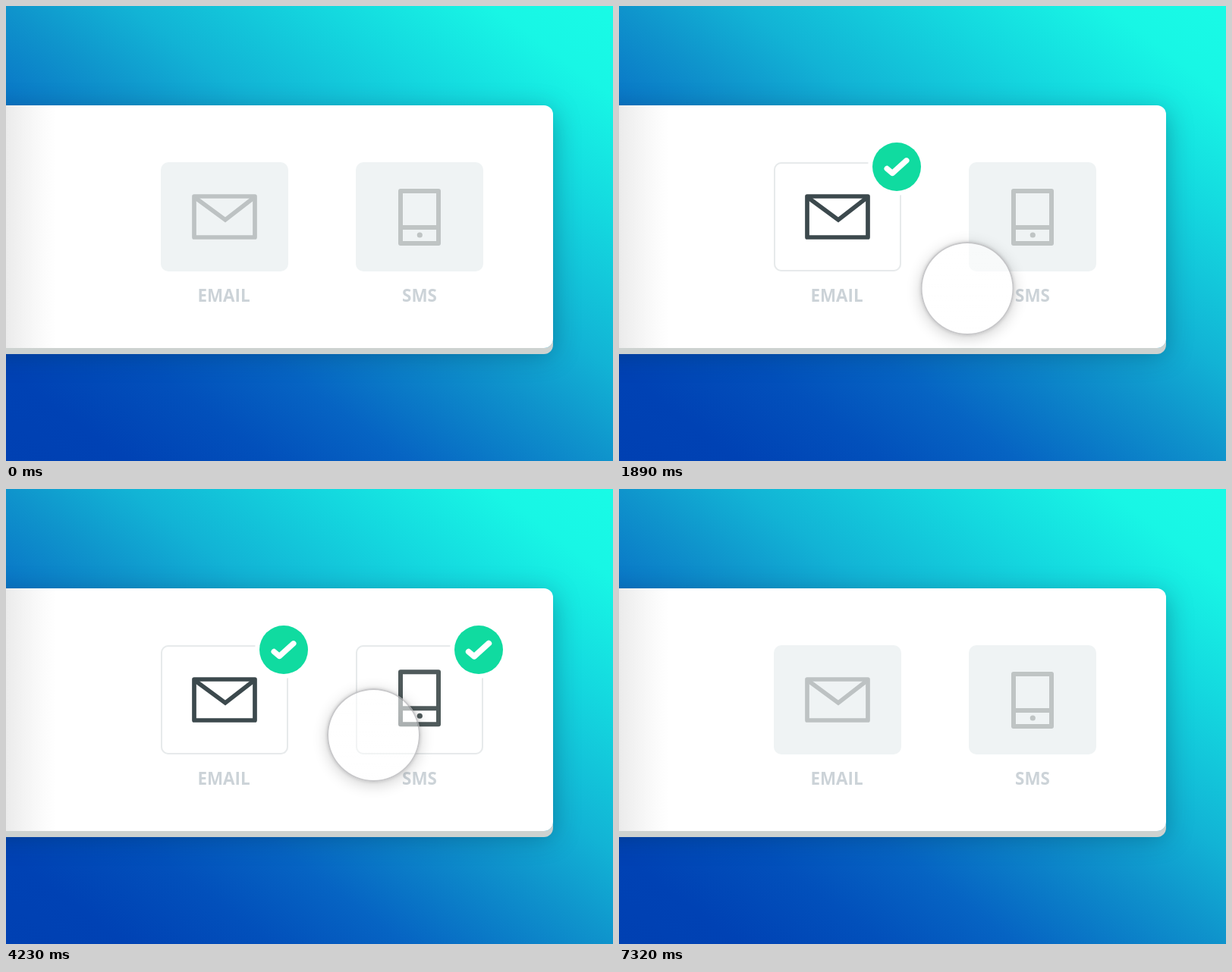
These frames come from a looping animation (800 px wide and 600 px high, 8.34 s). An HTML page:

```html
<!DOCTYPE html>
<html lang="en">
<head>
<meta charset="utf-8">
<title>Notification options</title>
<style>
  html, body { margin: 0; width: 100%; height: 100%; overflow: hidden; }
  #stage {
    position: relative; width: 800px; height: 600px; overflow: hidden;
    background: linear-gradient(to top right, #0040b2, #0042b4 10%, #0250bb 22%, #0664c3 33%,
      #0f94cc 50%, #12b3d5 60%, #14d8df 76%, #18f6e5 90%, #18fbe6);
  }
  #panel {
    position: absolute; left: -40px; top: 131px; width: 761px; height: 320px;
    border-radius: 0 12px 12px 0;
    background: linear-gradient(90deg, #ebebeb 40px, #f4f4f4 65px, #fbfbfb 88px, #fff 106px);
    box-shadow: 0 8px 0 #cdd2d0, 0 8px 34px rgba(0, 40, 70, .36);
  }
  svg { position: absolute; left: 0; top: 0; }
  text { font: 700 22.4px "Open Sans", sans-serif; fill: #ccd3d8; text-anchor: middle; }
  .icon { fill: none; stroke-linejoin: round; }
  .on { fill: #fff; stroke: #e7eaeb; stroke-width: 2; }
  .check { fill: none; stroke: #fff; stroke-width: 7.4; stroke-linecap: round; stroke-linejoin: round; }
  #cursor {
    position: absolute; left: -61.5px; top: -61.5px; width: 123px; height: 123px;
    box-sizing: border-box; border-radius: 50%; border: 2px solid rgba(182, 182, 184, .75);
    background: linear-gradient(rgba(255, 255, 255, .6), rgba(255, 255, 255, .4));
    background-clip: padding-box;
    box-shadow: 0 0 4px rgba(0, 0, 0, .15), 0 4px 19px rgba(0, 0, 0, .19);
  }
</style>
</head>
<body>
<div id="stage">
  <div id="panel"></div>
  <svg width="800" height="600" viewBox="0 0 800 600">
    <g id="email"></g>
    <g id="sms" transform="translate(257 0)"></g>
  </svg>
  <div id="cursor"></div>
</div>
<script>
const LOOP = 8340, STEP = 30;

const envelope = `<g stroke-width="5.7"><rect x="248" y="251" width="80" height="54"/>
  <path d="M249 252.5L289 282L327 252.5" stroke-linejoin="miter"/></g>`;
const phone = `<g stroke-width="6"><rect x="263" y="244" width="50" height="69"/>
  <path d="M263 292H313"/></g><circle class="dot" cx="288.3" cy="302" r="3.6" stroke="none"/>`;

function buildOption(id, icon, label, x) {
  const root = document.getElementById(id);
  root.innerHTML = `<rect x="204" y="206" width="168" height="144" rx="10" fill="#eff3f4"/>
    <rect class="on" x="205" y="207" width="166" height="142" rx="9"/>
    <g class="icon">${icon}</g>
    <g class="badge"><circle r="38" fill="#fff"/><circle r="32" fill="#10dba0"/></g>
    <path class="check" d="M-12.8 2.5L-5.7 8.5L12.8 -8.2"/>
    <text x="${x}" y="390">${label}</text>`;
  const find = name => root.querySelector("." + name);
  return { on: find("on"), icon: find("icon"), badge: find("badge"), check: find("check"), dot: find("dot") };
}

const email = buildOption("email", envelope, "EMAIL", 287);
const sms = buildOption("sms", phone, "SMS", 288);
const cursor = document.getElementById("cursor");

const clamp = v => Math.min(1, Math.max(0, v));
const span = (t, a, b) => clamp((t - a) / (b - a));
const mix = (a, b, k) => a + (b - a) * k;
const hump = k => Math.sin(Math.PI * k);
const easeOut = k => 1 - (1 - k) ** 3;
const easeInOut = k => k < .5 ? 2 * k * k : 1 - 2 * (1 - k) ** 2;
const backOut = (k, s) => k > 0 ? 1 + (s + 1) * (k - 1) ** 3 + s * (k - 1) ** 2 : 0;

// The icon dips, then jumps and settles
function lift(p) {
  const k = span(p, .4, 1);
  return 34 * hump(span(p, 0, .4)) ** 4 - 109 * k * (1 - k) ** 1.6;
}

// p runs from 0 (off) to 1 (on)
function drawOption(o, p, off, on) {
  const shade = span(p, .5, 1);
  const ink = `rgb(${off.map((c, i) => Math.round(mix(c, on[i], shade)))})`;
  const place = (el, scale) => el.setAttribute("transform", `translate(366 212) scale(${scale})`);
  o.on.style.opacity = span(p, .2, .4);
  o.icon.setAttribute("transform", `translate(0 ${lift(p)})`);
  o.icon.setAttribute("stroke", ink);
  if (o.dot) o.dot.setAttribute("fill", ink);
  place(o.badge, backOut(span(p, .28, .6), 3.2));
  place(o.check, backOut(span(p, .5, 1), 3));
  o.check.style.visibility = p > .5 ? "visible" : "hidden";
}

// start, end, from, control, to, easing
const moves = [
  [0, 420, [880, 226], [520, 230], [257, 346], easeOut],
  [1124, 1470, [257, 346], [535, 432], [411, 455], easeInOut],
  [1830, 2040, [411, 455], [450, 390], [484, 324], easeOut],
  [5638, 6090, [484, 324], [414, 327], [344, 329.5], easeOut],
  [6930, 7320, [344, 329.5], [500, 411], [890, 405], easeInOut]
];
const presses = [[750, 960], [2490, 2730], [3930, 4200]];

function cursorAt(t) {
  const [a, b, from, ctrl, to, ease] = moves.filter(m => t >= m[0]).pop();
  const k = ease(span(t, a, b));
  return [0, 1].map(i => mix(mix(from[i], ctrl[i], k), mix(ctrl[i], to[i], k), k));
}

function draw(t) {
  drawOption(email, span(t, 960, 1470) - span(t, 6240, 6630), [189, 194, 195], [60, 73, 77]);
  drawOption(sms, span(t, 2720, 3240) - span(t, 4195, 4740), [191, 196, 196], [62, 74, 75]);
  const [x, y] = cursorAt(t);
  const dip = presses.reduce((sum, [a, b]) => sum + hump(span(t, a, b)), 0);
  cursor.style.transform = `translate(${x}px, ${y}px) scale(${1 - .1 * dip})`;
}

const begin = performance.now();
function tick() {
  const t = (performance.now() - begin) % LOOP;
  draw(Math.floor(t / STEP) * STEP);
  requestAnimationFrame(tick);
}
draw(0);
requestAnimationFrame(tick);
</script>
</body>
</html>
```
